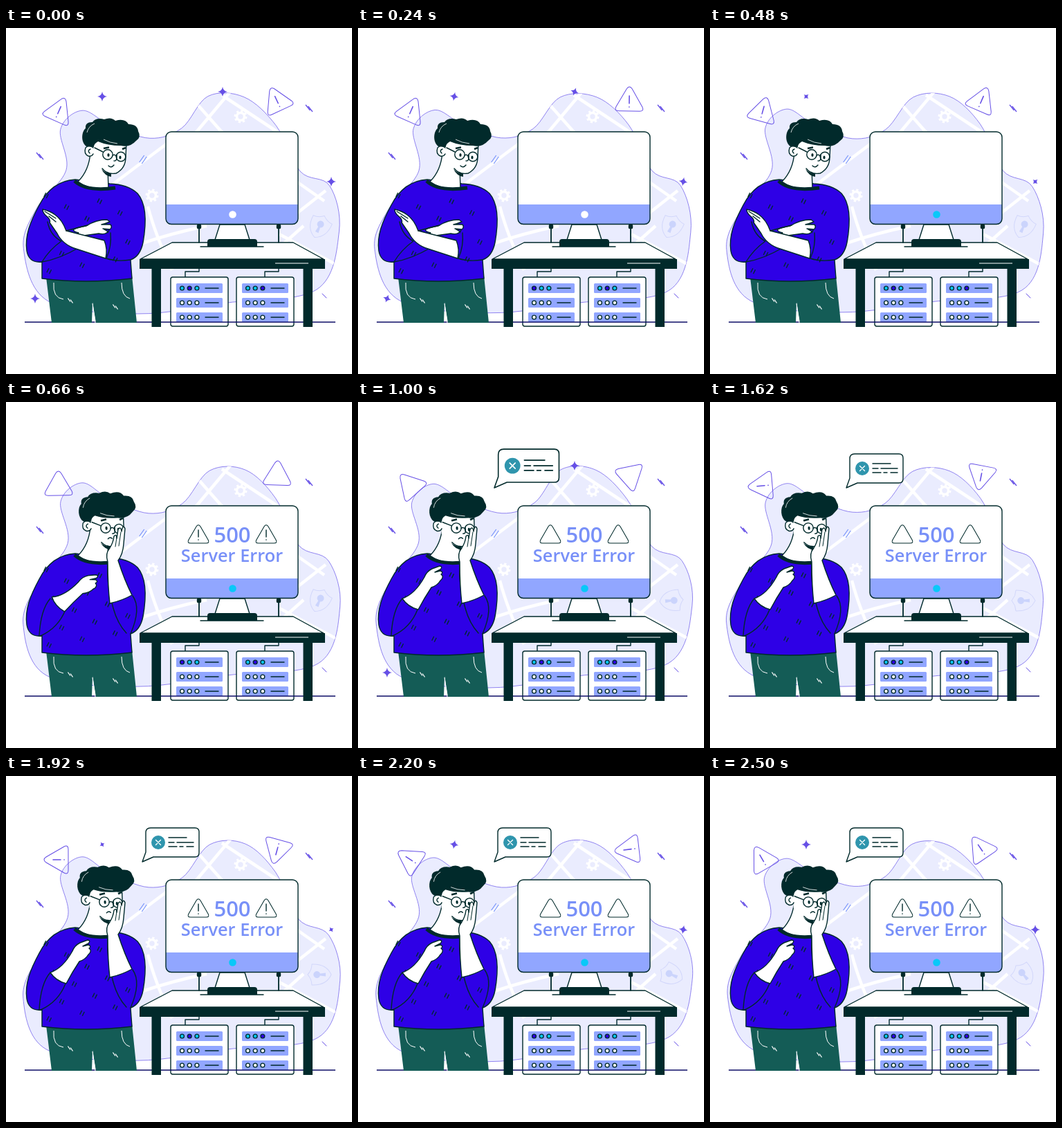
Write an HTML page that moves like this. It is 500 px wide and 500 px high and loops after 2.52 s.

```html
<!DOCTYPE html>
<html lang="en">
<head>
<meta charset="utf-8">
<title>Server error</title>
<style>
  html, body { margin: 0; width: 100%; height: 100%; overflow: hidden; background: #fff; }
  svg { display: block; width: 100vw; height: 100vh; }
  text { font-family: "Open Sans", sans-serif; font-weight: 600; fill: #7890f8; text-anchor: middle; }
  .ink { stroke: #012a2b; stroke-width: 1.4; stroke-linecap: round; stroke-linejoin: round; }
  .line { fill: none; }
  .skin { fill: #fff; }
  .dark { fill: #012a2b; }
  .violet { stroke: #6650e6; stroke-width: 1; fill: none; stroke-linecap: round; }
  .blue { fill: #91a6ff; }
</style>
</head>
<body>
<svg viewBox="0 0 500 500">
  <defs>
    <path id="blob"/>
    <clipPath id="inside"><use href="#blob"/></clipPath>
    <path id="triangle" d="M-4-18Q0-24 4-18L19 8Q22 14 15 14H-15Q-22 14-19 8Z"/>
    <path id="mark" d="M0-8V3M0 8V8.2"/>
    <path id="star" d="M0-7Q1-1 7 0Q1 1 0 7Q-1 1-7 0Q-1-1 0-7Z"/>
    <g id="gear" fill="none" stroke="#fff">
      <circle r="5.5" stroke-width="3.6"/>
      <circle r="8" stroke-width="3" stroke-dasharray="3.1 3.18"/>
    </g>
    <g id="cable" class="ink line">
      <path d="M279 288V310M279 347V352H259V360"/>
      <rect x="276.5" y="284.5" width="5" height="5" rx="1" class="dark"/>
    </g>
  </defs>

  <use href="#blob" fill="#eaecfe" stroke="#7766ec" stroke-width=".8"/>
  <g clip-path="url(#inside)" fill="none" stroke="#fff" stroke-width="4.5">
    <path d="M270 103L316 155M324 92L272 154M312 97L395 152M238 163L150 229M120 345Q185 308 290 286M205 258Q216 300 240 350M420 222L460 250M462 235L420 268M395 298L485 346M375 335L430 286"/>
  </g>
  <use href="#gear" x="339" y="128"/>
  <use href="#gear" x="211" y="242"/>
  <g id="shield" fill="none" stroke="#d2d7fb">
    <path d="M0-17Q7-11 15-11Q16 10 0 17Q-16 10-15-11Q-7-11 0-17Z"/>
    <path d="M-2.5 9L-1.5 1A5 5 0 1 1 1.5 1L2.5 9Z" fill="#cbd4fc" stroke="none"/>
  </g>
  <g id="scatter"></g>
  <g id="stars" fill="#6650e6"></g>
  <g id="alerts"></g>

  <!-- desk, servers and monitor -->
  <use href="#cable"/>
  <use href="#cable" x="115"/>
  <g id="servers"></g>
  <path d="M27 425H476" stroke="#0c0c66" stroke-width="1.4"/>
  <path class="ink skin" d="M240 310H415L459 334H194Z"/>
  <path class="dark" d="M193 334H461V348H443V432H429.500V348H224V432H210.500V348H193Z"/>
  <path d="M389 340H437" stroke="#fff" stroke-width="1.2"/>
  <path class="ink" d="M279 290V310M394 290V310"/>
  <path class="ink skin" d="M309 284H345L352 306H302Z"/>
  <path class="dark" d="M291 316V309Q291 305 295 305H359Q363 305 363 309V316Z"/>
  <path class="ink" d="M281 316H372"/>
  <rect class="skin" x="231" y="150" width="191" height="133.500" rx="8"/>
  <path class="blue" d="M231 255H422V276Q422 283.500 414 283.500H239Q231 283.500 231 276Z"/>
  <rect class="ink line" x="231" y="150" width="191" height="133.500" rx="8"/>
  <circle id="power" cx="327.500" cy="269.500" r="5.300"/>
  <g id="message">
    <text x="327" y="202.500" font-size="31">500</text>
    <text x="326.500" y="231" font-size="25.400">Server Error</text>
    <g class="ink line">
      <use href="#triangle" transform="translate(278 193.500) scale(.75)"/>
      <use href="#triangle" transform="translate(376 193.500) scale(.75)"/>
      <path id="warning" d="M278 185V195M278 199V199.200M376 185V195M376 199V199.200"/>
    </g>
  </g>

  <!-- man -->
  <path d="M58 360L66 426H124L125 396L130 426H189L182 358Z" fill="#145c56"/>
  <path d="M69 368Q67 390 83 392M167 368Q167 388 179 391M125 398L129 426" fill="none" stroke="#fff"/>
  <path class="ink" fill="#2e00e6" stroke-width="1.2" d="M100 219Q66 221 48 256C35 280 27 300 30 322Q33 340 52 338V362Q115 370 182 362L180 335Q194 330 198 310C203 282 203 254 190 239Q176 226 150 225Z"/>
  <g id="knit"></g>
  <path class="ink skin" d="M122 180Q120 206 104 222Q122 235 148 231L147 203Z"/>
  <path d="M99 221Q116 237 158 231" fill="none" stroke="#012a2b" stroke-width="5"/>
  <g id="head">
    <path class="skin" d="M125 158L125 190L147 208Q158 213 166 205Q173 197 173 186L174 160Z"/>
    <path class="ink line" d="M139 203Q146 212 159 210Q173 203 173 186L174 166"/>
    <path class="dark" d="M138 204Q145 211 152 210V215Q143 214 138 204Z"/>
    <path class="ink skin" d="M126 173Q120 168 115 173Q112 182 119 185Q124 186 126 182"/>
    <path class="ink line" d="M121 181Q117 177 122 175" stroke-width="1"/>
    <path class="dark" d="M116 171C108 165 109 150 115 145Q114 136 125 136Q130 129 142 132Q152 128 158 134Q172 130 177 139Q190 139 191 149Q196 158 188 163Q179 173 166 170Q147 170 133 164Q127 167 127 172Z"/>
    <path d="M117 151Q119 142 128 138M141 161Q150 166 161 167" fill="none" stroke="#fff" stroke-width=".8"/>
    <g class="ink line">
      <path d="M128 173L140 179M154 184Q157 182 159 185M160 183Q161 193 156 192"/>
      <circle cx="147" cy="183" r="7.200"/>
      <circle cx="166" cy="186" r="6.800"/>
    </g>
    <ellipse class="dark" cx="148" cy="183.500" rx="1.600" ry="2.600"/>
    <ellipse class="dark" cx="165" cy="187" rx="1.600" ry="2.600"/>
    <path id="brows" d="M141 174L149 172.500M168 175L173 173" stroke="#012a2b" stroke-width="2.600"/>
    <path id="mouth" class="ink line"/>
  </g>
  <g id="calm" class="ink">
    <path class="line" d="M60 280Q64 300 80 308Q63 320 52 338Q77 334 106 317M145 333Q153 315 151 296M145 333Q160 338 180 335"/>
    <path class="skin" d="M80 305L105 296Q86 291 116 286Q130 277 146 277L150 280Q143 283 138 284L151 284Q154 288 150 291L140 290L147 294Q145 299 134 297L105 301Z"/>
    <path class="skin" d="M53 262Q65 265 71 270Q81 277 87 293L142 307Q147 319 144 333L101 319Q82 313 74 297L63 281Q65 278 60 273Q53 268 53 262Z"/>
    <path class="line" d="M56 265L72 275M62 272L72 280M87 293L118 285"/>
  </g>
  <g id="worried" class="ink">
    <path class="line" d="M147 232Q145 265 155 298Q161 320 174 334M183 280Q196 298 180 335M64 284Q50 300 48 338M86 300Q76 326 50 338"/>
    <path class="skin" d="M147 231Q143 219 150 211Q155 203 156 194Q160 190 160 197L162 184Q166 179 167 187Q169 176 172 183L170 205Q169 220 162 229Q171 257 182 279Q168 287 150 291Q147 265 147 231Z"/>
    <path class="line" d="M160 196L158 209M166 188L163 208" stroke-width="1"/>
    <path id="forearm" class="skin" d="M64 284Q82 278 96 253Q99 245 107 241L118 237Q123 238 119 242L111 246L119 244Q124 246 120 249L122 251Q123 255 119 258Q115 265 106 268Q96 283 87 300Q72 296 64 284Z"/>
  </g>

  <g id="bubble" class="ink">
    <path class="skin" d="M209 75H273Q279 75 279 81V111Q279 117 273 117H213L197 124L202 110V82Q202 75 209 75Z"/>
    <circle cx="220" cy="96" r="10" fill="#2f95ad" stroke="none"/>
    <path d="M216.500 92.500L223.500 99.500M223.500 92.500L216.500 99.500" stroke="#fff"/>
    <path d="M235 89H261M235 96H243M247 96H271M235 102H247M251 102H256M261 102H271"/>
  </g>
</svg>

<script>
const LOOP = 2520, INK = '#012a2b', CYAN = '#08c8f8', BLUE = '#2e00e6', VIOLET = '#6650e6';
const $ = id => document.getElementById(id);

function add(parent, tag, attrs) {
  const node = document.createElementNS('http://www.w3.org/2000/svg', tag);
  for (const key in attrs) node.setAttribute(key, attrs[key]);
  return parent.appendChild(node);
}
const set = (node, key, value) => node.setAttribute(key, value);
const show = (node, visible) => set(node, 'visibility', visible ? 'visible' : 'hidden');

// Smooth step from 0 at time a to 1 at time b
function ease(t, a, b) {
  const u = Math.min(1, Math.max(0, (t - a) / (b - a)));
  return u * u * (3 - 2 * u);
}

// Bump of height 1 around a peak time
function pulse(t, peak, reach) {
  const u = Math.min(1, Math.abs(t - peak) / reach);
  return Math.max(0, Math.cos(u * Math.PI / 2)) ** .3 * (u < 1);
}

// Pair of short staggered strokes
function ticks(parent, x, y, lean, color, size) {
  const stroke = side => `M${x + side * 1.8 - lean * size} ${y + side + size}l${2 * lean * size} ${-2 * size}`;
  add(parent, 'path', { d: stroke(-1) + stroke(1), stroke: color, 'stroke-width': 1.3 });
}
ticks($('scatter'), 49, 185, -.8, VIOLET, 4);
ticks($('scatter'), 198, 190, .7, '#7c97fb', 5);
ticks($('scatter'), 438, 116, -.8, VIOLET, 4);
add($('scatter'), 'path', { d: 'M457 384L463 390', class: 'violet' });

for (let i = 0; i < 14; i++) ticks($('knit'), 58 + i * .618 % 1 * 125, 242 + i * 8.4, .5, INK, 3);
ticks($('knit'), 93, 394, -.7, '#fff', 2.5);
ticks($('knit'), 158, 403, -.7, '#fff', 2.5);

const addStar = () => add($('stars'), 'use', { href: '#star' });
const stars = [
  { x: 139, y: 99, early: false, node: addStar() },
  { x: 470, y: 222, early: false, node: addStar() },
  { x: 313, y: 92, early: true, node: addStar() },
  { x: 42, y: 391, early: true, node: addStar() }
];

const alerts = [[76, 121], [392, 106]].map(([x, y]) => {
  const group = add($('alerts'), 'g', { class: 'violet' });
  add(group, 'use', { href: '#triangle' });
  return { x, y, group, mark: add(group, 'use', { href: '#mark', 'stroke-width': 1.6 }) };
});

const lamps = [238, 333].map(x => {
  const server = add($('servers'), 'g', { transform: `translate(${x} 360)`, class: 'ink' });
  add(server, 'rect', { width: 83, height: 71, rx: 3, fill: '#fff' });
  const rows = [16, 37, 58].map(y => {
    add(server, 'rect', { x: 8, y: y - 7, width: 67, height: 14, rx: 1.5, class: 'blue', stroke: 'none' });
    add(server, 'path', { d: `M50 ${y}H69` });
    return [0, 1, 2].map(k => add(server, 'circle', { cx: 16.5 + 10.7 * k, cy: y, r: 2.9, fill: '#fff' }));
  });
  return rows[0];
});

const outline = [[110, 118], [150, 140], [207, 160], [254, 146], [293, 99], [345, 99], [390, 140],
  [424, 207], [467, 229], [482, 295], [450, 378], [320, 396], [190, 412], [60, 395], [25, 320],
  [45, 262], [88, 205], [79, 145]];

// Closed smooth curve through the gently wobbling outline
function blobPath(t) {
  const points = outline.map(([x, y], i) => {
    const phase = t / LOOP * 4 * Math.PI + i * 1.1;
    return [x + 1.2 * Math.sin(phase), y + 1.2 * Math.cos(phase)];
  });
  const at = i => points[(i + points.length) % points.length];
  return points.reduce((d, p, i) => {
    const before = at(i - 1), next = at(i + 1), after = at(i + 2);
    const c1 = p.map((v, k) => v + (next[k] - before[k]) / 6);
    const c2 = next.map((v, k) => v - (after[k] - p[k]) / 6);
    return d + `C${c1} ${c2} ${next}`;
  }, 'M' + points[0]) + 'Z';
}

function drawBackdrop(t) {
  set($('blob'), 'd', blobPath(t));

  const late = pulse(t, -40, 630) + pulse(t, LOOP - 40, 630);
  const early = pulse(t, 0, 400) + pulse(t, 1000, 300);
  for (const star of stars) {
    const s = star.early ? early : late;
    set(star.node, 'transform', `translate(${star.x} ${star.y}) rotate(${(1 - s) * 140}) scale(${s})`);
  }

  const turns = [
    24 - 119 * ease(t, 250, 1650) + 65 * ease(t, 1800, LOOP),
    -25 + 51 * ease(t, 0, 480) - 195 * ease(t, 400, 1600) + 135 * ease(t, 1850, LOOP)
  ];
  alerts.forEach(({ x, y, group, mark }, i) => {
    set(group, 'transform', `translate(${x} ${y}) rotate(${turns[i]})`);
    show(mark, t < 560 || t > 1600);
  });
  const shieldTurn = 25 + 60 * ease(t, 660, 1000) - 175 * ease(t, 1000, 1550) + 50 * ease(t, 1900, LOOP);
  set($('shield'), 'transform', `translate(453 287) rotate(${shieldTurn})`);
}

function draw(t) {
  drawBackdrop(t);

  const flicker = Math.cos(t / 500 * 2 * Math.PI) < 0 ? 0 : 1;
  lamps.forEach((row, i) => row.forEach((lamp, k) =>
    set(lamp, 'fill', k === flicker + i ? BLUE : CYAN)));

  const failed = t >= 560;
  set($('power'), 'fill', t < 300 ? '#fff' : CYAN);
  show($('message'), failed);
  show($('warning'), failed && Math.cos((t - 660) / 660 * 2 * Math.PI) > -.5);

  show($('calm'), !failed);
  show($('worried'), failed);
  set($('head'), 'transform', failed ? `translate(${-1 - 2 * ease(t, 660, 850)}) rotate(-5 135 205)` : '');
  set($('brows'), 'transform', failed ? 'translate(0 -2)' : '');
  set($('mouth'), 'd', failed ? 'M149 199Q152 196 155 199' : 'M148 199Q152 203 156 198');
  set($('forearm'), 'transform', `rotate(${20 - 20 * ease(t, 560, 850)} 74 292)`);

  const pop = 1.14 * ease(t, 820, 980) - .14 * ease(t, 1020, 1200);
  show($('bubble'), pop > 0);
  set($('bubble'), 'transform', `translate(197 124) scale(${pop}) translate(-197 -124)`);
}

const start = performance.now();
function tick() {
  draw((performance.now() - start) % LOOP);
  requestAnimationFrame(tick);
}
tick();
</script>
</body>
</html>
```
